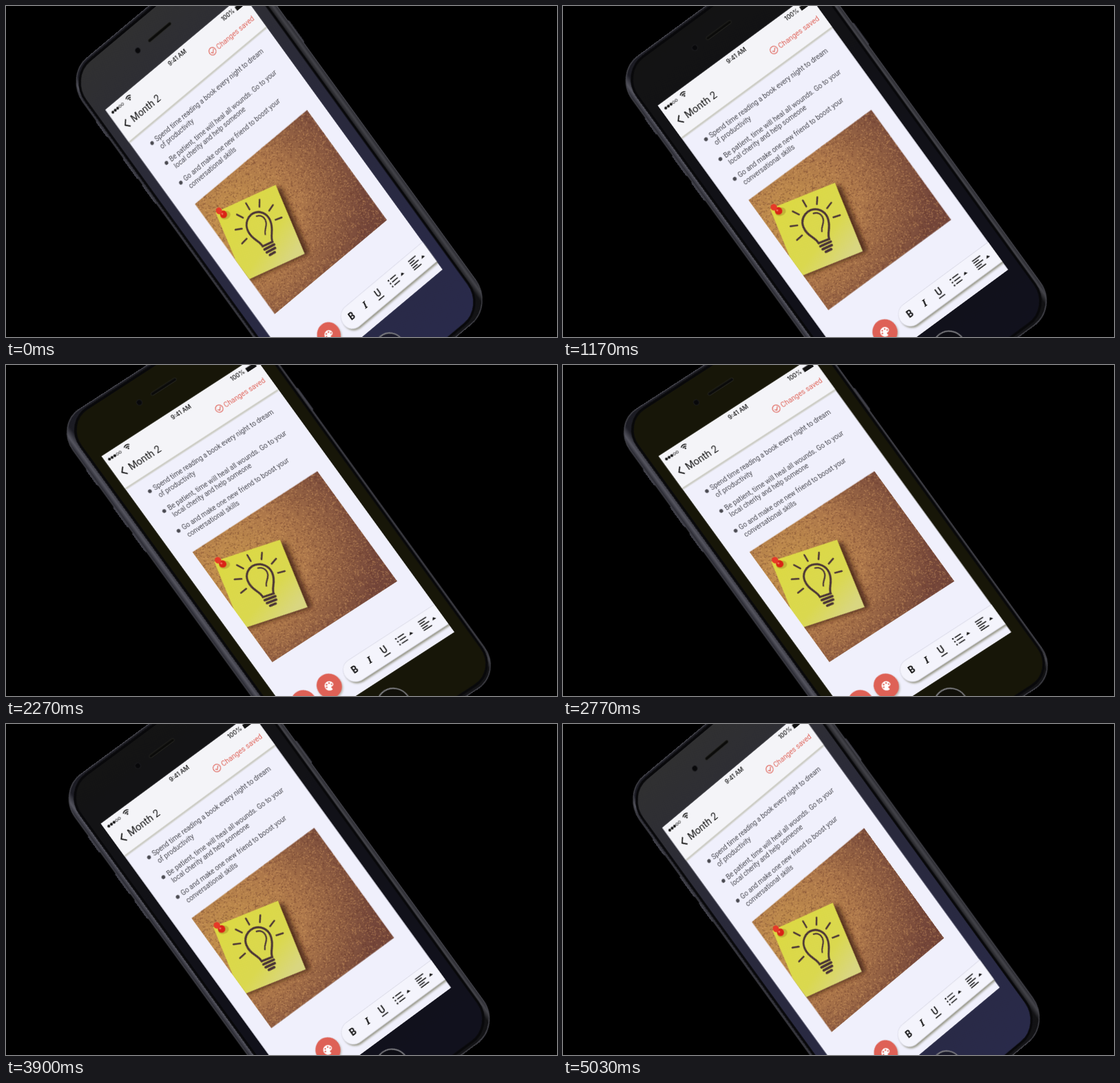
An HTML page for the animation above (5.06 s loop, 800 px wide and 480 px high).

```html
<!DOCTYPE html>
<html lang="en">
<head>
<meta charset="utf-8">
<title>Tilting phone</title>
<style>
html, body { margin: 0; width: 100%; height: 100%; overflow: hidden; background: #000; }
svg { display: block; width: 800px; height: 480px; }
text { font-family: Roboto, "Open Sans", sans-serif; }
.status { font: 500 12px Inter, Roboto, sans-serif; fill: #111; }
.note { font-size: 13.8px; fill: #4b4b52; }

.phone, .back, .face, .sheen { animation: 2530ms linear infinite alternate; }
.phone { animation-name: sway; }
.back { animation-name: edge; }
.face { animation-name: tone; }
.sheen { animation-name: sheen; }

@keyframes sway {
  0%    { transform: matrix(.5333, -.4466, .4348, .5986, 144, 150.4); }
  18.8% { transform: matrix(.5530, -.4434, .4348, .5986, 141.3, 148.9); }
  28.9% { transform: matrix(.5693, -.4401, .4348, .5986, 139.2, 148.2); }
  62.1% { transform: matrix(.5971, -.4188, .4348, .5986, 136, 140.5); }
  70.8% { transform: matrix(.5940, -.4074, .4348, .5986, 136.7, 137.6); }
  89.7% { transform: matrix(.5939, -.3845, .4348, .5986, 138.4, 132.3); }
  100%  { transform: matrix(.5922, -.3714, .4348, .5986, 139.2, 129.2); }
}
@keyframes edge {
  0%    { transform: translateX(1px); }
  100%  { transform: translateX(-12px); }
}
@keyframes tone {
  0%, 71% { fill: #030303; }
  89%, 100% { fill: #171608; }
}
@keyframes sheen {
  0% { opacity: 1; }
  29% { opacity: .8; }
  60%, 100% { opacity: 0; }
}
</style>
</head>
<body>
<svg viewBox="0 0 800 480">
  <defs>
    <linearGradient id="sheen" x1="0" y1="0" x2="0" y2="1">
      <stop offset="0" stop-color="#2f2f30"/>
      <stop offset=".4" stop-color="#28283a"/>
      <stop offset="1" stop-color="#28294a"/>
    </linearGradient>
    <linearGradient id="rim">
      <stop offset="0" stop-color="#22222a"/>
      <stop offset=".02" stop-color="#55555f"/>
      <stop offset=".05" stop-color="#1c1c24"/>
      <stop offset=".96" stop-color="#121214"/>
      <stop offset=".985" stop-color="#44444a"/>
      <stop offset="1" stop-color="#26262c"/>
    </linearGradient>
    <radialGradient id="cork" cx=".15" cy=".3" r=".95">
      <stop offset="0" stop-color="#c6944c"/>
      <stop offset=".5" stop-color="#ad774a"/>
      <stop offset="1" stop-color="#75473a"/>
    </radialGradient>
    <linearGradient id="paper" x1=".2" y1="0" x2=".75" y2="1">
      <stop offset="0" stop-color="#dcd944"/>
      <stop offset=".65" stop-color="#dad84f"/>
      <stop offset="1" stop-color="#d9d680"/>
    </linearGradient>
    <clipPath id="screen"><rect width="375" height="667"/></clipPath>
    <clipPath id="photo"><rect x="35.8" y="255" width="305.6" height="267"/></clipPath>
    <filter id="soft" x="-30%" y="-30%" width="160%" height="160%"><feGaussianBlur stdDeviation="5"/></filter>
    <filter id="thin" x="-10%" y="-40%" width="120%" height="180%"><feGaussianBlur stdDeviation="2"/></filter>
  </defs>

  <g class="phone">
    <g class="back">
      <g fill="#3c3c46">
        <rect x="-32" y="5" width="8" height="40" rx="3"/>
        <rect x="-32" y="96" width="8" height="50" rx="3"/>
        <rect x="-32" y="160" width="8" height="46" rx="3"/>
        <rect x="413" y="96" width="7" height="54" rx="3"/>
      </g>
      <rect x="-29" y="-101" width="446" height="886" rx="61" fill="url(#rim)" stroke="#43434a" stroke-width="2"/>
    </g>
    <rect class="face" x="-23" y="-95" width="425" height="873" rx="57"/>
    <rect class="sheen" x="-23" y="-95" width="425" height="873" rx="57" fill="url(#sheen)"/>
    <rect x="-22" y="-94" width="423" height="871" rx="56" fill="none" stroke="#08080a" stroke-width="5"/>
    <circle cx="128" cy="-48" r="5.5" fill="#08080a" stroke="#222226"/>
    <rect x="157" y="-51" width="61" height="6" rx="3" fill="#0b0b0a" stroke="#2b2b26"/>
    <circle cx="187.5" cy="722" r="33" fill="#08080a" fill-opacity=".5" stroke="#7c7c80" stroke-width="2.5"/>

    <g clip-path="url(#screen)">
      <rect width="375" height="667" fill="#f0f0fc"/>
      <rect y="76" width="375" height="4.5" fill="#b4b4a0" filter="url(#thin)"/>
      <rect width="375" height="78" fill="#f4f4f8"/>

      <g id="dots" stroke="#111" stroke-width="1"></g>
      <g fill="none" stroke="#111" stroke-width="1.8">
        <path d="M48 10.5q6.5-5.5 13 0M50.5 13.5q4-3.5 8 0"/>
        <circle cx="54.5" cy="16" r=".8"/>
      </g>
      <text class="status" x="186" y="17" text-anchor="middle">9:41 AM</text>
      <text class="status" x="308" y="17">100%</text>
      <path d="M345 9h22v9h-22zM368 12h2v3h-2z" fill="#111"/>

      <path d="M23 40l-8 8.5 8 8.5" fill="none" stroke="#111" stroke-width="2.4"/>
      <text x="33" y="56" font-size="20.3" fill="#161616">Month 2</text>
      <g fill="none" stroke="#e0665c" stroke-width="1.6">
        <circle cx="253.5" cy="47.5" r="7.5"/>
        <path d="M249.5 47.5l3 3.2 5.5-6"/>
      </g>
      <text x="265.5" y="53" font-size="14.5" fill="#e0665c">Changes saved</text>

      <g id="list"></g>

      <g clip-path="url(#photo)">
        <rect x="35.8" y="255" width="305.6" height="267" fill="url(#cork)"/>
        <path id="dark" stroke="#5d3024" stroke-opacity=".45" stroke-width="1.8"/>
        <path id="light" stroke="#dfa868" stroke-opacity=".45" stroke-width="1.8"/>
        <g transform="translate(60.7 294) rotate(14.2)">
          <rect x="8" y="8" width="141" height="140" fill="#34150c" opacity=".75" filter="url(#soft)"/>
          <rect width="140" height="145" fill="url(#paper)"/>
          <g transform="translate(2 1)" fill="none" stroke="#4a3436" stroke-width="4.2" stroke-linecap="round">
            <path d="M62 97C61 84 46 77 46 57a26 26 0 0 1 52 0c0 20-13 27-13 40z"/>
            <path d="M75 39c12 1 16 11 13 20c-3 8-9 10-11 19" stroke-width="3"/>
            <path d="M63 104l23-1M65 111l20-1M69 118l12-1" stroke-width="5"/>
            <g id="rays" stroke-width="3.4"></g>
          </g>
          <ellipse cx="17" cy="13" rx="11" ry="8" fill="#8d6d20" opacity=".35"/>
          <circle cx="14" cy="10" r="7.5" fill="#d92416"/>
          <circle cx="8" cy="0" r="6.5" fill="#e63a28"/>
          <circle cx="12" cy="8" r="2" fill="#f2705c"/>
        </g>
      </g>

      <rect x="141" y="605" width="260" height="46" rx="23" fill="#77775c" opacity=".75" filter="url(#thin)"/>
      <rect x="140" y="600" width="260" height="47" rx="23.5" fill="#f4f4fc" stroke="#d6d6e4"/>
      <g fill="#111" font-weight="700" font-size="19" text-anchor="middle">
        <text x="164" y="629.5">B</text>
        <text x="200" y="629.5" style="font-family:'Noto Serif',serif" font-style="italic">I</text>
        <text x="236.5" y="628" font-weight="500">U</text>
      </g>
      <g stroke="#111" stroke-width="2" fill="none">
        <path d="M229 632.5h15M274 615.5h15M274 622.5h15M274 629.5h15"/>
        <path d="M268 615.5h3M268 622.5h3M268 629.5h3" stroke-width="2.8"/>
        <path d="M326 612h20M326 617h13M326 622h20M326 627h13M326 632h20"/>
      </g>
      <path d="M296.5 624.5h9l-4.5-5zM352.5 624.5h9l-4.5-5z" fill="#111"/>

      <circle cx="102" cy="625" r="25" fill="#77775c" opacity=".5" filter="url(#thin)"/>
      <circle cx="102" cy="622" r="25" fill="#de6156"/>
      <path d="M102 612.5a9.5 9.5 0 1 0 0 19c2 0 2.6-1.6 1.6-3c-1-1.6 0-3 1.6-3h2.3c2.6 0 4-2 4-4.5c0-5-4.3-8.5-9.5-8.5z" fill="#fff"/>
      <g fill="#de6156">
        <circle cx="96" cy="621.5" r="1.6"/><circle cx="99" cy="617" r="1.6"/>
        <circle cx="105" cy="617" r="1.6"/><circle cx="108" cy="621.5" r="1.6"/>
      </g>
      <circle cx="40" cy="622" r="25" fill="#de6156"/>
    </g>
  </g>
</svg>
<script>
const byId = id => document.getElementById(id);

// signal strength
for (let i = 0; i < 5; i++)
  byId('dots').innerHTML += `<circle cx="${10 + i * 6.5}" cy="13.5" r="2.4" fill="${i < 3 ? '#111' : 'none'}"/>`;

const items = [
  ['Spend time reading a book every night to dream', 'of productivity'],
  ['Be patient, time will heal all wounds. Go to your', 'local cherity and help someone'],
  ['Go and make one new friend to boost your', 'conversational skills']
];
byId('list').innerHTML = items.map(([first, second], i) => {
  const y = 114.5 + i * 48;
  return `<circle cx="38.5" cy="${y - 5}" r="3.8" fill="#4b4b52"/>
    <text class="note" x="48" y="${y}">${first}</text>
    <text class="note" x="48" y="${y + 16.5}">${second}</text>`;
}).join('');

// light rays around the bulb
let rays = '';
for (let i = 0; i < 7; i++) {
  const a = (-200 + i * 34) * Math.PI / 180;
  const at = r => `${72 + r * Math.cos(a)} ${58 + r * Math.sin(a)}`;
  rays += `M${at(37)}L${at(51)}`;
}
byId('rays').innerHTML = `<path d="${rays}"/>`;

// cork grain
let seed = 7;
const rand = () => (seed = seed * 16807 % 2147483647) / 2147483647;
const grain = n => {
  let d = '';
  while (n--) d += `M${(36 + rand() * 305).toFixed(1)} ${(255 + rand() * 267).toFixed(1)}h2`;
  return d;
};
byId('dark').setAttribute('d', grain(3200));
byId('light').setAttribute('d', grain(2800));
</script>
</body>
</html>
```
